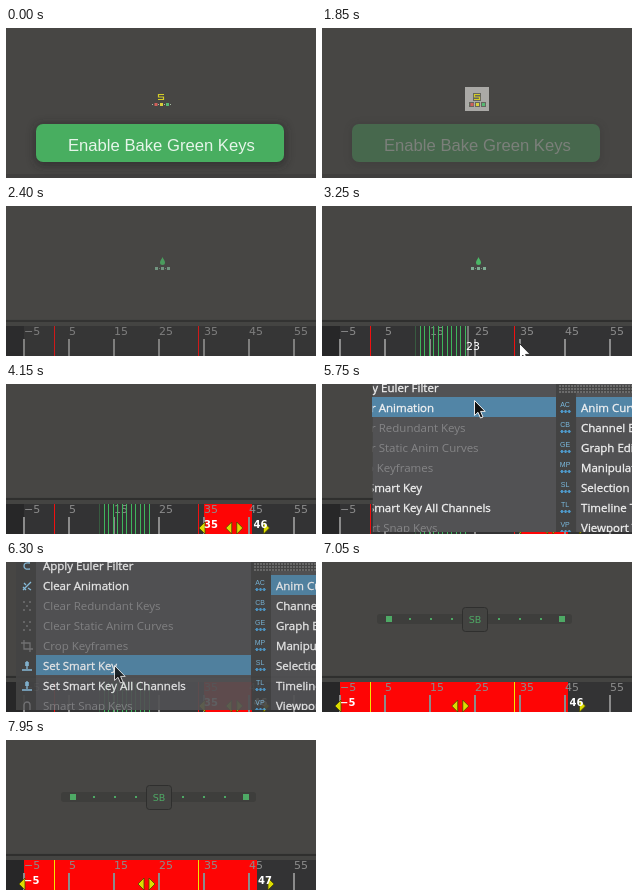
An HTML page that plays this animation: 310x150 px, repeating every 8000 ms.

```html
<!DOCTYPE html>
<html lang="en">
<head>
<meta charset="utf-8">
<title>Animation tools</title>
<style>
html, body { margin: 0; width: 100%; height: 100%; overflow: hidden; background: #474644; }
#stage { position: relative; width: 310px; height: 150px; overflow: hidden; background: #474644; }
svg { position: absolute; left: 0; top: 0; }
.anim, .sub, .main, .bar { animation: 8s linear infinite; }

/* Button scene */
.button { animation-name: button; }
.hover { animation-name: hover; }
.icon { animation-name: icon; }
@keyframes button { 0%, 21.25% { opacity: 1 } 23.125% { opacity: .33 } 24.375%, 100% { opacity: 0 } }
@keyframes hover { 0%, 5.6% { opacity: 0 } 10.6%, 100% { opacity: 1 } }
@keyframes icon { 0%, 24.4% { opacity: 1 } 28.1%, 100% { opacity: 0 } }

/* Timeline scene */
.timeline { animation-name: timeline; }
.timeline rect { shape-rendering: crispEdges; }
.drop { animation-name: drop; }
.rail { animation-name: rail; }
@keyframes timeline { 0%, 24.4% { opacity: 0 } 31.25%, 100% { opacity: 1 } }
@keyframes drop { 0%, 26% { opacity: 0 } 31.25%, 42.5% { opacity: 1 } 48.75%, 100% { opacity: 0 } }
@keyframes rail { 0%, 88.12% { opacity: 0 } 88.125%, 100% { opacity: 1 } }

/* Menus */
#menus { position: absolute; left: 0; top: 0; width: 310px; height: 148px; overflow: hidden;
  font: 11.5px/20px "Open Sans", sans-serif; color: #f2f2f2; animation-name: menus; }
#slide { position: absolute; left: 0; top: 0; animation-name: slide; }
.main, .sub { position: absolute; top: 0; overflow: hidden; background: #525254; }
.main { left: -2px; width: 162px; height: 148px; animation-name: unfold; }
.sub { left: -237px; width: 235px; height: 160px; animation-name: reveal; }
.main::before, .sub::before { content: ""; position: absolute; left: 0; top: 0; bottom: 0; width: 20px; background: #434343; }
.tear { position: absolute; left: 3px; top: 1px; width: 100%; height: 8px;
  background: radial-gradient(circle at 1px 1px, #6c6c6c .8px, transparent 1px) 0 0 / 3px 3px #454545; }
.row { position: absolute; left: 0; width: 100%; height: 20px; white-space: nowrap; }
.row span { position: absolute; left: 25px; -webkit-text-stroke: .3px currentColor; }
.sub .row span { left: 27px; }
.row i { position: absolute; left: 2px; top: 0; width: 14px; text-align: center; font: 7px/13px "Liberation Sans", sans-serif; color: #7ab8dc; }
.main .row i::after { content: ""; position: absolute; left: 2px; top: 12px; width: 11px; height: 3px;
  background: radial-gradient(circle, #4f9bcc 1.3px, transparent 1.6px) 0 0 / 3.7px 3px; }
.row svg { left: 5px; top: 4px; fill: none; stroke: #8cc4e4; stroke-width: 1.3; }
.row.off { color: #858587; }
.row.off span { -webkit-text-stroke-width: 0; }
.row.off svg { stroke: #747476; }
.bar { position: absolute; left: 20px; right: 0; top: 13px; height: 20px; background: #5285a6; }
.main .bar { animation-name: open; }
.sub .bar { animation-name: pick; }
.shelf { animation-name: shelf; }
@keyframes menus { 0%, 59.3% { opacity: 0 } 59.375%, 78.1% { opacity: 1 } 78.75% { opacity: .93 } 82%, 100% { opacity: 0 } }
@keyframes slide {
  0%, 59.375% { transform: translate(127px, 16px) }
  65.625% { transform: translate(127px, 7px) }
  69.4% { transform: translate(127px, 0) }
  71.875% { transform: translate(236px, 0); animation-timing-function: ease-out }
  76.25%, 100% { transform: translate(247px, 0) } }
@keyframes unfold { 0%, 59.375% { height: 0 } 65.625% { height: 119px } 69.4%, 100% { height: 148px } }
@keyframes reveal {
  0%, 69.4% { clip-path: inset(0 0 0 235px) }
  71.875% { clip-path: inset(0 0 0 52px); animation-timing-function: ease-out }
  76.25%, 100% { clip-path: inset(0) } }
@keyframes open { 0%, 68.7% { opacity: 0 } 68.75%, 100% { opacity: 1 } }
@keyframes pick { 0%, 73.7% { transform: none } 73.75%, 100% { transform: translateY(80px) } }
@keyframes shelf { 0%, 59.3% { opacity: 0 } 59.375%, 69.4% { opacity: 1 } 69.5%, 100% { opacity: 0 } }

/* Pointer: white over the scene, dark over the submenu */
.cursor { animation-name: cursor; }
.cursor path { animation-name: ink; }
@keyframes ink { 0%, 69.4% { fill: #fff; stroke: #333 } 69.5%, 100% { fill: #111; stroke: #eee } }
@keyframes cursor {
  0%, 5.6% { transform: translate(156px, 72px); opacity: 0 }
  10.6%, 21.25% { transform: translate(156px, 72px); opacity: 1 }
  22.5% { transform: translate(156px, 72px); opacity: 0 }
  31.8% { transform: translate(233px, 40px); opacity: 0 }
  31.875% { transform: translate(233px, 40px); opacity: 1; animation-timing-function: ease-in-out }
  40.625%, 42.5% { transform: translate(197px, 137px); opacity: 1; animation-timing-function: ease-in-out }
  48.75%, 51.2% { transform: translate(247px, 137px); opacity: 1 }
  51.8% { transform: translate(249px, 150px); opacity: 0 }
  59.3% { transform: translate(155px, -20px); opacity: 0 }
  59.375% { transform: translate(155px, -20px); opacity: 1 }
  64%, 66.5% { transform: translate(155px, 0); opacity: 1 }
  69.4%, 72% { transform: translate(152px, 16px); opacity: 1; animation-timing-function: ease-in-out }
  75.6%, 78.1% { transform: translate(108px, 103px); opacity: 1 }
  82%, 100% { transform: translate(108px, 103px); opacity: 0 } }
</style>
</head>
<body>
<div id="stage">
  <svg width="310" height="150" viewBox="0 0 310 150">
    <defs>
      <filter id="soft" x="-10%" y="-40%" width="120%" height="180%"><feGaussianBlur stdDeviation="4"/></filter>
    </defs>
    <rect y="146" width="310" height="4" fill="#403f3e"/>

    <g class="anim button">
      <rect x="29" y="96" width="251" height="42" rx="8" fill="#222" opacity=".5" filter="url(#soft)"/>
      <rect x="30" y="96" width="248" height="38" rx="7" fill="#48ae60"/>
      <text x="62" y="122.5" font-family="Liberation Sans, sans-serif" font-size="16.65" fill="#e6f5e9">Enable Bake Green Keys</text>
    </g>

    <g class="anim icon">
      <g class="anim hover">
        <rect x="143" y="59" width="24" height="24" fill="#aaa9a6"/>
        <path d="M151 65h8v8h-8zM147 74h5v5h-5zM153 74h5v5h-5zM159 74h5v5h-5z" fill="#65655e"/>
      </g>
      <path d="M158 66.500h-5.500v2.500h5v2.500h-5.500" fill="none" stroke="#d3cc28" stroke-width="1.200"/>
      <path d="M146 76h1v1h-1zM152 76h1v1h-1zM158 76h1v1h-1zM164 76h1v1h-1z" fill="#a9bda6"/>
      <rect x="148.500" y="75" width="3" height="3" fill="#d0605a"/>
      <rect x="154" y="75" width="3" height="3" fill="#d8cf3c"/>
      <rect x="160" y="75" width="3" height="3" fill="#55b972"/>
    </g>

    <g class="anim drop">
      <path d="M156.500 51c1 2.500 2.500 3.500 2.500 5.500a2.500 2.500 0 0 1-5 0c0-2 1.500-3 2.500-5.500z" fill="#4bb766"/>
      <path d="M149 61h3v3h-3zM155 61h3v3h-3zM161 61h3v3h-3z" fill="#7fae94"/>
      <path d="M153 62h1v1h-1zM159 62h1v1h-1z" fill="#6f9a82"/>
    </g>

    <g class="anim rail">
      <rect x="55" y="52" width="195" height="10" rx="3" fill="#3e3e3c"/>
      <g id="dots" fill="#4ea965"></g>
      <rect x="140.500" y="45.500" width="25" height="24" rx="3" fill="#434341" stroke="#2f2f2e"/>
      <text x="153" y="60.500" text-anchor="middle" font-family="DejaVu Sans, sans-serif" font-size="9.500" fill="#4ea965">SB</text>
    </g>

    <g class="anim timeline" font-family="DejaVu Sans, sans-serif">
      <rect y="113" width="310" height="37" fill="#444442"/>
      <rect y="114" width="310" height="2" fill="#2f2f2e"/>
      <rect y="120" width="310" height="30" fill="#333334"/>
      <rect y="120" width="18" height="30" fill="#272728"/>
      <rect id="span" x="18" y="120" width="0" height="30" fill="#fe0505"/>
      <g id="ticks" fill="#8b8b8b" font-size="11"></g>
      <g id="baked" fill="#3fb55c"></g>
      <g id="keys"><rect x="48" y="120" width="1" height="30"/><rect x="192" y="120" width="1" height="30"/></g>
      <g id="now">
        <rect x="1" y="120" width="2" height="30" fill="#777"/>
        <text y="144" font-size="11" fill="#fff"></text>
      </g>
      <g id="range" font-size="10" font-weight="700" fill="#fff">
        <g id="arrows" fill="#dcdc00" stroke="#4a4a00" stroke-width=".8"></g>
        <text y="144"></text><text y="144"></text>
      </g>
    </g>

    <g class="anim shelf">
      <path d="M127 0h183v4h-183z" fill="#414140"/>
      <path d="M185 3l3-3h3l-4 3z" fill="#5589a8"/>
      <path d="M247 2h5M254 1l4 2M260 2h4M267 1h5M286 1h9" stroke="#aaa" fill="none"/>
    </g>
  </svg>

  <div id="menus" class="anim">
    <div id="slide" class="anim">
      <div class="sub"><div class="bar"></div></div>
      <div class="main"><div class="tear"></div><div class="bar"></div></div>
    </div>
  </div>

  <svg width="310" height="150" viewBox="0 0 310 150">
    <g class="anim cursor">
      <path class="anim" d="M.5 .5V15.500L4 12.300L6.500 18L9 17L6.600 11.400H11.200Z"/>
    </g>
  </svg>
</div>

<script>
const LOOP = 8000;
const $ = id => document.getElementById(id);
const frameX = f => 18 + (f + 5) * 4.5;
const progress = (t, from, to) => Math.min(1, Math.max(0, (t - from) / (to - from)));
const ease = p => p * p * (3 - 2 * p);
const signed = n => String(n).replace('-', '−');

function add(parent, tag, attrs, text = '') {
  const el = document.createElementNS('http://www.w3.org/2000/svg', tag);
  for (const key in attrs) el.setAttribute(key, attrs[key]);
  el.textContent = text;
  return parent.appendChild(el);
}

function addRow(menu, y, icon, label, off) {
  const row = document.createElement('div');
  row.className = off ? 'row off' : 'row';
  row.style.top = y + 'px';
  row.innerHTML = `${icon}<span>${label}</span>`;
  menu.append(row);
}

[['AC', 'Anim Curve'], ['CB', 'Channel Box'], ['GE', 'Graph Editor'], ['MP', 'Manipulator'],
 ['SL', 'Selection'], ['TL', 'Timeline'], ['VP', 'Viewport']]
  .forEach(([code, name], i) =>
    addRow(document.querySelector('.main'), 14 + i * 20, `<i>${code}</i>`, name + ' Tools'));

const glyphs = {
  loop: 'M9 3Q3 2 3 6T9 9',
  clear: 'M2 10L10 2M3 3l2 2M7 8l3 2M2 7l3 3',
  dots: 'M2 2h2M8 2h2M5 6h2M2 10h2M8 10h2',
  crop: 'M3 0v9h9M0 3h9v9',
  key: 'M6 1v8M4 3h4M4 5h4M1 10h10',
  snap: 'M3 11V5a3 3 0 0 1 6 0v6'
};

[['loop', 'Apply Euler Filter'], ['clear', 'Clear Animation'], ['dots', 'Clear Redundant Keys', 1],
 ['dots', 'Clear Static Anim Curves', 1], ['crop', 'Crop Keyframes', 1], ['key', 'Set Smart Key'],
 ['key', 'Set Smart Key All Channels'], ['snap', 'Smart Snap Keys', 1]]
  .forEach(([glyph, name, off], i) => addRow(document.querySelector('.sub'), -6 + i * 20,
    `<svg width="12" height="12"><path d="${glyphs[glyph]}"/></svg>`, name, off));

for (let f = -5; f <= 55; f += 10) {
  add($('ticks'), 'rect', { x: frameX(f) - 1, y: 133, width: 2, height: 17 });
  add($('ticks'), 'text', { x: frameX(f), y: 129 }, signed(f));
}

const baked = [];
for (let f = 12; f <= 23; f++) {
  baked.push(add($('baked'), 'rect', { x: Math.floor(frameX(f)) - 1, y: 120, width: 1, height: 30, opacity: f === 12 ? .3 : 1 }));
}

for (const x of [88, 109, 130, 177, 198, 219]) add($('dots'), 'rect', { x: x - 1, y: 56, width: 2, height: 2 });
for (const x of [67, 240]) add($('dots'), 'rect', { x: x - 3, y: 54, width: 6, height: 6 });

const left = 'M3 138V150L-3 144Z', right = 'M-3 138V150L3 144Z';
const arrows = [left, left, right, right].map(d => add($('arrows'), 'path', { d }));
const [startText, endText] = document.querySelectorAll('#range > text');
const nowText = document.querySelector('#now text');
const show = (el, on) => el.setAttribute('visibility', on ? 'visible' : 'hidden');

function drawRange(start, end) {
  const x1 = frameX(start), x2 = frameX(end);
  const a = x1 - 2, b = x2 + 13, mid = (a + b) / 2;
  $('span').setAttribute('x', x1);
  $('span').setAttribute('width', Math.max(0, x2 - x1 - 1.5));
  [a, mid - 5.5, mid + 5.5, b].forEach((x, i) => arrows[i].setAttribute('transform', `translate(${x} 0)`));
  startText.setAttribute('x', x1);
  startText.textContent = signed(start);
  endText.setAttribute('x', x2);
  endText.textContent = Math.round(end);
}

function draw(t) {
  const full = t >= 7050, ranged = t >= 3400;

  const now = 13 + Math.round(10 * ease(progress(t, 2550, 3200)));
  show($('now'), t >= 2550 && !ranged);
  $('now').setAttribute('transform', `translate(${frameX(now)} 0)`);
  nowText.textContent = now;
  baked.forEach((el, i) => show(el, t >= 2550 && i + 12 <= now && !full));
  $('keys').setAttribute('fill', full ? '#f2e600' : '#f01010');

  show($('range'), ranged);
  show($('span'), ranged);
  if (full) drawRange(-5, 46 + progress(t, 7750, 7950));
  else drawRange(35, 35 + Math.round(11 * ease(progress(t, 3400, 3900))));
}

function tick() {
  draw(performance.now() % LOOP);
  requestAnimationFrame(tick);
}
tick();
</script>
</body>
</html>
```
